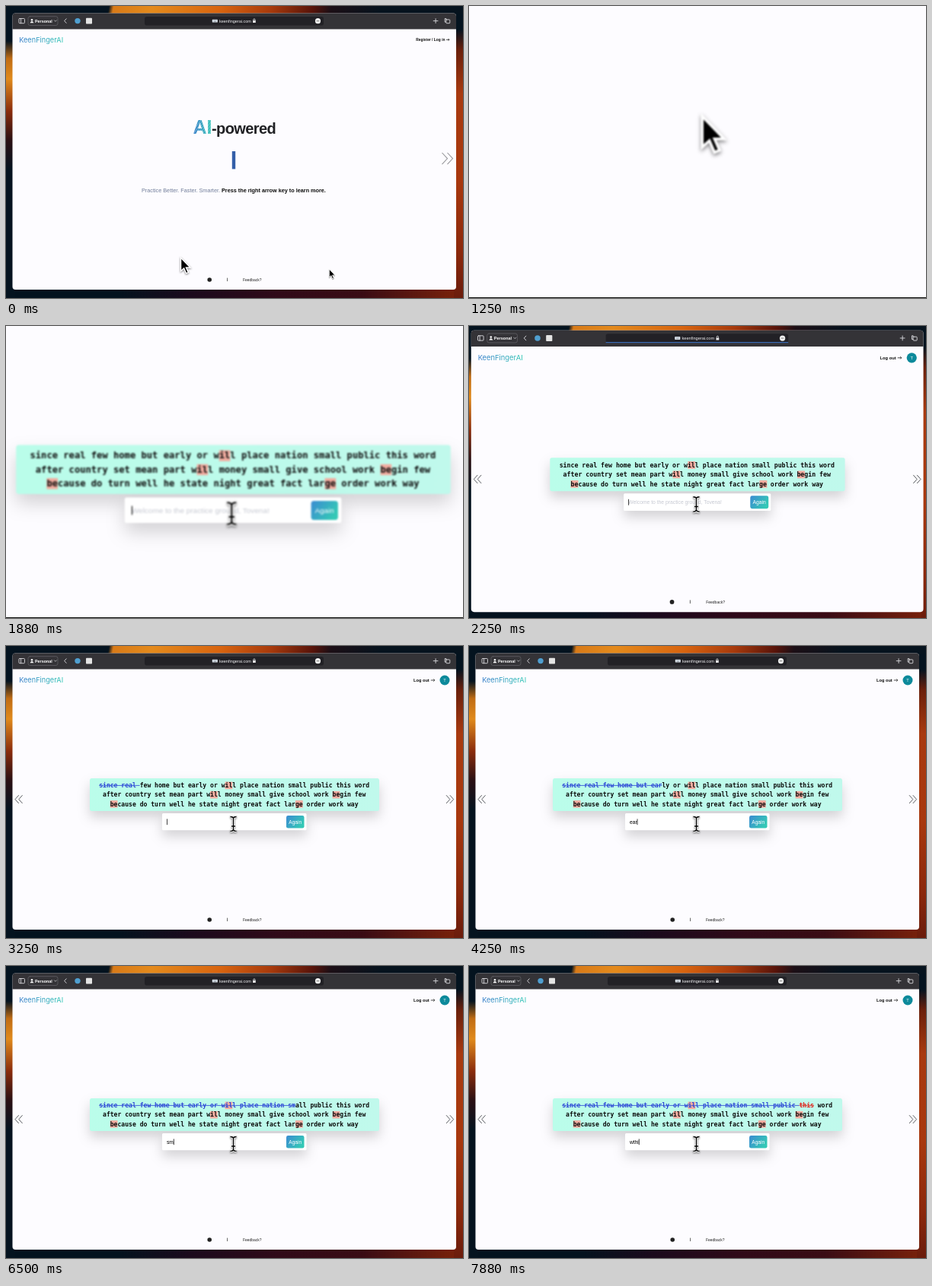
An HTML page for the animation above (8 s loop, 600x384 px).

```html
<!DOCTYPE html>
<html lang="en">
<head>
<meta charset="utf-8">
<title>Typing practice</title>
<style>
  html, body { margin: 0; width: 100%; height: 100%; overflow: hidden; background: #04131f; }
  #view { position: relative; width: 600px; height: 384px; max-width: 100%; max-height: 100%; overflow: hidden; contain: strict; }
  #stage {
    position: absolute; left: 0; top: 0; width: 600px; height: 384px; overflow: hidden;
    transform-origin: 303px 209px;
    background:
      linear-gradient(100deg, #04131f 22.5%, #d87a18 23.5%, #e48a1c 32%, #d8640f 47%, #a83a0c 58%, #58140a 67%, #1c0f16 71%, #06131e 82%) 0 0 / 600px 10px no-repeat,
      linear-gradient(#04131f 12%, #c06c14 18%, #e08a1c 25%, #8a2c0c 36%, #2a1014 46%, #05131f 56%) 0 0 / 12px 384px no-repeat,
      linear-gradient(#04131f 8%, #6a200c 15%, #a83a10 30%, #a8380e 60%, #8a280c 85%, #6a1c0c) 588px 0 / 12px 384px no-repeat,
      linear-gradient(90deg, #04121e 25%, #1a0a1c 40%, #300a18 60%, #3a0c14 78%, #7c220a) 0 370px / 600px 14px no-repeat,
      #04131f;
  }
  #edge { position: absolute; left: 0; top: 383px; width: 600px; height: 1px; background: #111; }
  svg { position: absolute; left: 0; top: 0; overflow: hidden; }
  text { font-family: "Liberation Sans", Arial, sans-serif; white-space: pre; }
  .b { font-weight: bold; }
  .mid { text-anchor: middle; }
  .logo { font: 9.2px Inter, sans-serif; }
  .line { fill: none; stroke: #d8d8dc; stroke-width: .9; stroke-linecap: round; stroke-linejoin: round; }
  .nav { fill: none; stroke: #4a4d52; stroke-width: .9; }
  .go { fill: none; stroke: #111; stroke-width: .75; }
  .words text { font: bold 8.08px "DejaVu Sans Mono", monospace; fill: #0c0c0c; }
  .words .done { fill: #2c46d6; text-decoration: line-through; }
  .words .bad { fill: #e0241c; text-decoration: line-through; }
  .card { filter: drop-shadow(0 8px 8px rgba(0, 0, 0, .17)); }
  .pointer { filter: drop-shadow(0 1px 1.2px rgba(0, 0, 0, .5)); }
</style>
</head>
<body>
<div id="view">
<div id="stage">
<svg width="600" height="384" viewBox="0 0 600 384">
  <defs>
    <linearGradient id="brand"><stop stop-color="#3b7fcb"/><stop offset="1" stop-color="#2fc6b4"/></linearGradient>
    <linearGradient id="button" x2="1" y2=".5"><stop stop-color="#3b8bd2"/><stop offset="1" stop-color="#34c8b6"/></linearGradient>
    <linearGradient id="mint"><stop stop-color="#bafdea"/><stop offset="1" stop-color="#c0f9ec"/></linearGradient>
    <pattern id="hatch" width="2.4" height="2.4" patternUnits="userSpaceOnUse" patternTransform="rotate(35)">
      <rect width=".7" height="2.4" fill="#fff" opacity=".4"/>
    </pattern>
    <path id="arrow" d="M0 0V17.6L4.1 13.9L7 20.6L9.9 19.4L7 12.9H12.5Z" fill="#000" stroke="#fff" stroke-width="1.5"/>
    <path id="beam" d="M-4 -9.5Q0 -9.5 0 -7Q0 -9.5 4 -9.5M0 -7V7M-2.4 3H2.4M-4 9.5Q0 9.5 0 7Q0 9.5 4 9.5" fill="none"/>
  </defs>

  <rect x="8.5" y="9.5" width="582.5" height="363.5" rx="4" fill="#fdfcff"/>
  <path d="M8.5 30.5V13.5a4 4 0 0 1 4-4H587a4 4 0 0 1 4 4V30.5Z" fill="#343337"/>

  <g id="toolbar">
    <g class="line">
      <rect x="17" y="16.5" width="7.5" height="6.2" rx="1"/><path d="M19.6 16.5v6.2"/>
      <rect x="29" y="13.7" width="39" height="11.8" rx="2.5" stroke="#66656a" stroke-width=".7"/>
      <path d="M63.4 18.8l1.5 1.5l1.5 -1.5" stroke-width=".7"/>
      <path d="M79.2 16.8l-2.6 2.8l2.6 2.8"/>
      <path d="M561.2 19.6h5.8M564.1 16.7v5.8"/>
      <path d="M577.8 17.9v-1.4h-1.6v4.6h1.5"/><rect x="577.8" y="17.9" width="5" height="4.8" rx=".8"/>
    </g>
    <circle cx="34" cy="18.2" r="1.3" fill="#fff"/><path d="M31.5 22.2q2.5 -4.4 5 0Z" fill="#fff"/>
    <text class="b" x="38" y="21.6" font-size="5.4" fill="#fff">Personal</text>
    <circle cx="94" cy="19.6" r="3.7" fill="#4f9fd0"/>
    <rect x="105" y="15.8" width="8" height="7.8" rx=".8" fill="#e4e4e4"/>
    <rect x="182" y="14" width="235" height="11.6" rx="2.8" fill="#222126"/>
    <rect x="270.8" y="17.8" width="7" height="3.8" rx=".6" fill="#dfe6ee"/>
    <path d="M272 19h4.6M272.6 20.5h3.4" stroke="#6b7580" stroke-width=".5"/>
    <text x="280" y="21.7" font-size="5.5" fill="#f0f0f2">keenfingerai.com</text>
    <rect x="324" y="19.1" width="3.8" height="3" rx=".5" fill="#e8e8ea"/>
    <path class="line" d="M324.8 19v-1a1.1 1.1 0 0 1 2.2 0v1" stroke-width=".6"/>
    <circle cx="409.5" cy="19.7" r="3.6" fill="#f0f0f0"/>
    <path d="M407.6 19.7h3.8" stroke="#333" stroke-width=".9" stroke-dasharray=".9 .55"/>
    <rect id="load" x="182" y="24.7" width="235" height="1" fill="#3d76cc"/>
  </g>

  <g id="frame">
    <text class="logo" x="17.2" y="47.8" fill="url(#brand)">KeenFingerAI</text>
    <circle cx="267.2" cy="360" r="2.8" fill="#222"/>
    <path d="M290.6 357.6v4.4" stroke="#222" stroke-width=".7"/>
    <text x="311" y="362.2" font-size="4.95" fill="#222">Feedback?</text>
  </g>

  <g id="home">
    <text class="b" x="538.2" y="46" font-size="4.9" fill="#111">Register / Log in</text>
    <path class="go" d="M578 44.3h4M580.6 42.9l1.4 1.4l-1.4 1.4"/>
    <text class="b" x="245.5" y="168.4" font-size="25" fill="url(#brand)">AI</text>
    <text class="b" x="245.5" y="168.4" font-size="25" fill="url(#hatch)">AI</text>
    <text class="b" x="270" y="168.3" font-size="20" letter-spacing="-.6" fill="#202124">-powered</text>
    <rect id="bar" x="296.8" y="191" width="4.4" height="23.4" fill="#345f a8"/>
    <text x="178" y="245" font-size="7.28" fill="#717d9a">Practice Better. Faster. Smarter. <tspan class="b" fill="#0c0c0c">Press the right arrow key to learn more.</tspan></text>
    <path class="nav" d="M572.5 193l7 7.6l-7 7.6M579.5 193l7 7.6l-7 7.6" style="stroke:#98989c;stroke-width:1.1"/>
  </g>

  <g id="practice">
    <text class="b" x="535" y="46.9" font-size="5.67" fill="#111">Log out</text>
    <path class="go" d="M557.8 45h5M561.2 43.4l1.6 1.6l-1.6 1.6"/>
    <circle cx="576" cy="45" r="6.5" fill="#0d8a9b"/>
    <text class="mid" x="576" y="47" font-size="5.6" fill="#fff">T</text>
    <path class="nav" d="M16.8 196.2l-4.8 5.4l4.8 5.4M21.6 196.2l-4.8 5.4l4.8 5.4M578 196.2l4.8 5.4l-4.8 5.4M582.8 196.2l4.8 5.4l-4.8 5.4"/>
    <rect class="card" x="110" y="174" width="380" height="43" rx="2.5" fill="url(#mint)"/>
    <g class="words" id="words"></g>
    <rect class="card" x="205" y="220" width="189.5" height="22.3" rx="1.5" fill="#fff"/>
    <rect x="368" y="223" width="23.5" height="16.6" rx="2.4" fill="url(#button)"/>
    <text class="mid" x="379.7" y="233.6" font-size="6.6" fill="#fff">Again</text>
    <text id="hint" x="211" y="233.5" font-size="6.65" fill="#c6c9d2">Welcome to the practice ground, Tovena!</text>
    <text id="typed" x="211" y="233.5" font-size="6.65" fill="#000"></text>
    <rect id="caret" y="227.4" width=".8" height="7.8" fill="#111"/>
  </g>

  <use id="ghost" class="pointer" href="#arrow" transform="translate(424.3 346) scale(.62)"/>
  <use id="mouse" class="pointer" href="#arrow"/>
  <g id="ibeam" class="pointer" transform="translate(298.5 234)">
    <use href="#beam" stroke="#fff" stroke-width="3.4"/><use href="#beam" stroke="#000" stroke-width="1.4"/>
  </g>
</svg>
</div>
<div id="edge"></div>
</div>

<script>
const LOOP = 8000, STEP = 125, ADVANCE = 8.08 * 0.602;
const $ = id => document.getElementById(id);
const show = (id, on) => { $(id).style.display = on ? '' : 'none'; };
const clamp = u => Math.min(1, Math.max(0, u));
const ease = u => u * u * (3 - 2 * u);

const lines = [
  'since real few home but early or will place nation small public this word',
  'after country set mean part will money small give school work begin few',
  'because do turn well he state night great fact large order work way'
];
// [line, first column] of each two-letter weak spot
const weak = [[0, 34], [1, 29], [1, 62], [2, 0], [2, 50]];
const words = lines[0].split(' ');

// '<' is a backspace
const keys = 'since real few home but early or will plac e<<e nation small public wthi';
const pace = [[2500, 0], [3250, 11], [5250, 44], [7875, keys.length]];

const lineX = i => 299.7 - lines[i].length * ADVANCE / 2;
const lineY = i => 186 + i * 12.25;

$('bar').setAttribute('fill', '#345fa8');
$('words').innerHTML =
  weak.map(([i, c]) => `<rect x="${lineX(i) + c * ADVANCE}" y="${lineY(i) - 7.4}" width="${2 * ADVANCE}" height="9.6" fill="#f2aca0"/>`).join('') +
  lines.map((s, i) => `<text x="${lineX(i)}" y="${lineY(i)}">` +
    (i ? s : '<tspan class="done"></tspan><tspan class="bad"></tspan><tspan></tspan>') + '</text>').join('');
const spans = $('words').querySelectorAll('tspan');

function keyCount(t) {
  for (let i = 1; i < pace.length; i++) {
    const [t0, n0] = pace[i - 1], [t1, n1] = pace[i];
    if (t < t1) return Math.floor(n0 + (n1 - n0) * clamp((t - t0) / (t1 - t0)));
  }
  return keys.length;
}

function typeState(count) {
  let word = 0, start = 0, input = '';
  for (const key of keys.slice(0, count)) {
    if (key === '<') input = input.slice(0, -1);
    else if (key === ' ' && input === words[word]) {
      start += input.length + 1;
      word++;
      input = '';
    } else input += key;
  }
  const goal = words[word], reach = Math.min(input.length, goal.length);
  let good = 0;
  while (good < reach && input[good] === goal[good]) good++;
  return { input, good: start + good, end: start + reach };
}

function zoomAt(t) {
  if (t < 1625) return 1 + 1.3 * ease(clamp((t - 875) / 375));
  return 1 + 1.3 * Math.pow(1 - clamp((t - 1625) / 750), 2.35);
}

function drawTyping(t) {
  const count = keyCount(t), { input, good, end } = typeState(count);
  spans[0].textContent = lines[0].slice(0, good);
  spans[1].textContent = lines[0].slice(good, end);
  spans[2].textContent = lines[0].slice(end);
  show('hint', count === 0);
  $('typed').textContent = input;
  $('caret').setAttribute('x', 211 + (input ? $('typed').getComputedTextLength() : 0));
}

function render(time) {
  const t = Math.floor(time % LOOP / STEP + 0.001) * STEP;
  const zoom = zoomAt(t), practice = t >= 1500;

  $('stage').style.transform = zoom > 1 ? `scale(${zoom})` : 'none';
  $('stage').style.filter = zoom > 1.05 ? `blur(${Math.min(0.55, (zoom - 1) * 1.1)}px)` : 'none';
  show('edge', zoom > 1.1);

  show('home', t < 1125);
  show('frame', t < 1125 || practice);
  show('practice', practice);
  show('ghost', t < 1000);
  show('mouse', t < 1625);
  show('ibeam', t >= 1625);
  show('load', t >= 1125 && t < 2625);
  $('load').setAttribute('width', 235 * clamp((t - 1000) / 1000));
  $('bar').setAttribute('opacity', 1 - 0.3 * clamp((t - 375) / 375));

  const go = ease(clamp((t - 875) / 375)), settle = ease(clamp((t - 1250) / 375));
  const x = 229.5 + 74.9 * go - 6 * settle, y = 331 - 149.8 * go + 46 * settle;
  $('mouse').setAttribute('transform', `translate(${x} ${y})`);

  if (practice) drawTyping(t);
}

const began = performance.now();
function tick() {
  render(performance.now() - began);
  requestAnimationFrame(tick);
}
tick();
</script>
</body>
</html>
```
